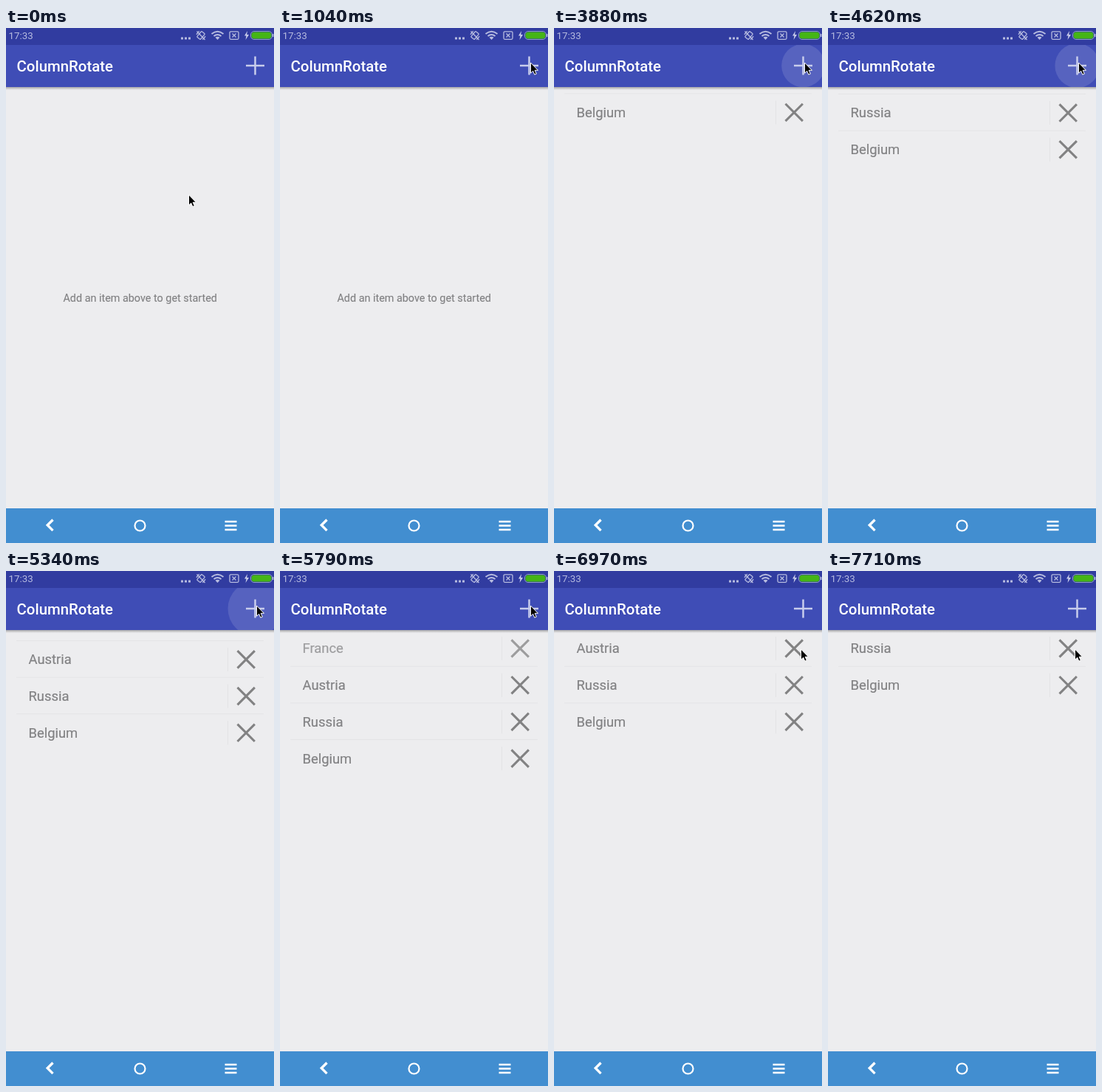
Animation of 363 by 698 pixels, one loop 8 s. Source, as an HTML page:

```html
<!DOCTYPE html>
<html lang="en">
<head>
<meta charset="utf-8">
<title>List animation</title>
<style>
  html, body { margin: 0; width: 100%; height: 100%; overflow: hidden; background: #ededef; }
  svg { display: block; width: 363px; height: 698px; font-family: Roboto, sans-serif; }
</style>
</head>
<body>
<svg viewBox="0 0 363 698">
  <defs>
    <linearGradient id="shade" x2="0" y2="1">
      <stop offset="0" stop-color="#000" stop-opacity=".3"/>
      <stop offset="1" stop-color="#000" stop-opacity="0"/>
    </linearGradient>
    <clipPath id="barClip"><rect y="23" width="363" height="57"/></clipPath>
  </defs>
  <rect width="363" height="698" fill="#ededef"/>
  <text id="hint" x="181.7" y="371" font-size="14.38" text-anchor="middle" fill="#818183" stroke="#818183" stroke-width=".15">Add an item above to get started</text>
  <g id="list"></g>

  <!-- App bar -->
  <rect y="80" width="363" height="4" fill="url(#shade)"/>
  <rect y="22" width="363" height="58" fill="#3f4db6"/>
  <circle id="ripple" cx="337.5" cy="51" fill="#fff" clip-path="url(#barClip)"/>
  <text x="14.5" y="59" font-size="20.4" font-weight="500" fill="#fff">ColumnRotate</text>
  <path d="M325 51h25M337.5 38.5v25" stroke="#c8cdec" stroke-width="2.5"/>

  <!-- Status bar -->
  <rect width="363" height="23" fill="#313ca0"/>
  <text x="3.5" y="15.3" font-size="13.3" fill="#b7bce0">17:33</text>
  <g fill="none" stroke="#b7bce0" stroke-width="1.3">
    <path d="M237 14h3m2 0h3m2 0h3" stroke-width="2.8"/>
    <g transform="rotate(40 264 10)">
      <rect x="261" y="5" width="6" height="10" rx="1"/>
      <path d="M258.5 7v6M269.5 7v6"/>
    </g>
    <path d="M258.5 4.5l11 11.500"/>
    <path d="M278.500 8q8-6.500 16 0M281.500 11q5-4 10 0" stroke-width="2"/>
    <path d="M283.500 12.800q3-2 6 0L286.500 16z" fill="#b7bce0" stroke="none"/>
    <rect x="303" y="4.800" width="12" height="10.500" rx="1.500"/>
    <path d="M306.500 7.500l5 5m0-5l-5 5"/>
    <path d="M327 4l-4 6.500h2.500l-1 5.500 4.500-7h-2.800z" fill="#c9cdea" stroke="none"/>
    <rect x="331.500" y="4.500" width="29" height="11" rx="4.500" stroke="#8e98c8" stroke-width="1"/>
    <rect x="332.500" y="5.500" width="27" height="9" rx="3.800" fill="#45b516" stroke="none"/>
    <path d="M361.800 8v4"/>
  </g>

  <!-- Navigation bar -->
  <rect y="651" width="363" height="47" fill="#428ed0"/>
  <g fill="none" stroke="#fff">
    <path d="M63.500 666.500l-7.300 7.300 7.300 7.300" stroke-width="3.400"/>
    <circle cx="181.500" cy="674.500" r="7" stroke-width="2.200"/>
    <path d="M296.500 669h16m-16 5.500h16m-16 5.500h16" stroke-width="2.600"/>
  </g>

  <path id="cursor" d="M0 0V14.200L3.200 11.200 5.300 16.200 7.800 15.100 5.700 10.300H10z" stroke="#fff" stroke-width="1" stroke-linejoin="round"/>
</svg>
<script>
const LOOP = 8000, TOP = 105, PITCH = 49.7, PHASE = 300;

// The screen only refreshes at these moments.
const ticks = [0, 300, 600, 750, 890, 1040, 2840, 3130, 3280,
  3880, 4030, 4180, 4330, 4470, 4620, 4770, 4910,
  5050, 5200, 5340, 5490, 5640, 5790, 5930, 6080,
  6370, 6520, 6670, 6820, 6970, 7260, 7410, 7560, 7710];

const cursorSteps = [[0, 247.5, 226], [300, 247.5, 226.5], [600, 249, 222], [750, 264, 180],
  [890, 312, 95], [1040, 339.5, 47], [5930, 338, 76], [6080, 334.5, 106]];

// Oldest row first; each new row pushes the older ones down.
const rows = [
  { name: 'Belgium', add: 2690, del: Infinity },
  { name: 'Russia', add: 3850, del: Infinity },
  { name: 'Austria', add: 4588, del: 7115 },
  { name: 'France', add: 5291, del: 6220 }
];

const byId = id => document.getElementById(id);
const phase = ms => Math.min(1, Math.max(0, ms / PHASE));
const decelerate = p => 1 - (1 - p) ** 2;
const smooth = p => (1 - Math.cos(Math.PI * p)) / 2;
const latest = (steps, t) => steps.filter(s => s[0] <= t).pop();

for (const row of rows) {
  row.node = document.createElementNS('http://www.w3.org/2000/svg', 'g');
  row.node.innerHTML = `
    <path class="divider" d="M14 -25.500H349" stroke="#e4e4e6"/>
    <path d="M300.500 -16V16" stroke="#e2e2e4"/>
    <text x="30.500" y="6.400" font-size="18.400" fill="#828284" stroke="#828284" stroke-width=".2">${row.name}</text>
    <path d="M313.500 -11.700l23.400 23.400m0 -23.400l-23.400 23.400" stroke="#828283" stroke-width="3.100"/>`;
  row.divider = row.node.querySelector('.divider');
  byId('list').append(row.node);
}

function space(row, t) {
  return decelerate(phase(t - row.add)) - decelerate(phase(t - row.del - PHASE));
}

function draw(t) {
  rows.forEach((row, i) => {
    const newer = rows.slice(i + 1);
    const y = TOP + PITCH * newer.reduce((sum, r) => sum + space(r, t), 0);
    const alpha = smooth(phase(t - row.add - PHASE)) - smooth(phase(t - row.del));
    const hasRowAbove = newer.some(r => t >= r.add && t < r.del);
    row.node.setAttribute('transform', `translate(0 ${y})`);
    row.node.setAttribute('opacity', alpha);
    row.divider.setAttribute('opacity', hasRowAbove ? 1 : 0);
  });

  byId('hint').setAttribute('opacity', t < rows[0].add ? 1 : 0);

  const pressed = rows.filter(r => r.add <= t).pop();
  const age = pressed ? t - pressed.add : Infinity;
  byId('ripple').setAttribute('r', Math.min(37, 17 + 0.41 * age));
  byId('ripple').setAttribute('opacity', Math.max(0, 0.14 * (1 - age / 300)));

  const [, x, y] = latest(cursorSteps, t);
  byId('cursor').setAttribute('transform', `translate(${x} ${y})`);
}

const start = performance.now();
function frame() {
  const t = (performance.now() - start) % LOOP;
  draw(ticks.filter(tick => tick <= t).pop());
  requestAnimationFrame(frame);
}
frame();
</script>
</body>
</html>
```
